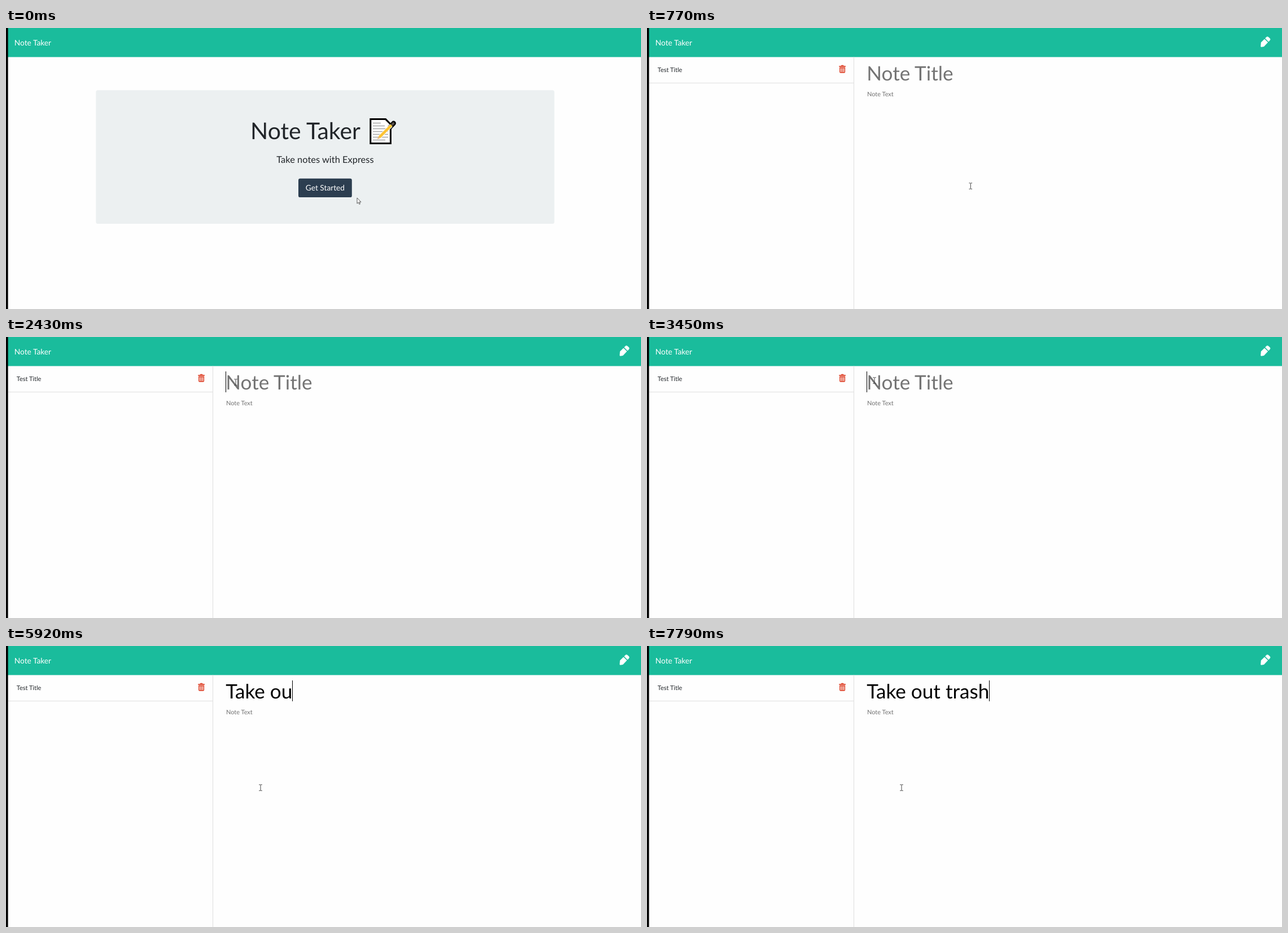
These frames come from a looping animation (1125 by 498 pixels, 8000 ms). An HTML page:

```html
<!DOCTYPE html>
<html lang="en">
<head>
<meta charset="utf-8">
<title>Note Taker</title>
<style>
  html, body { margin: 0; width: 100%; height: 100%; overflow: hidden; background: #fefefe; }
  svg { display: block; width: 100vw; height: 100vh; }
  text {
    font-family: Lato, "Open Sans", sans-serif;
    text-rendering: geometricPrecision;
    white-space: pre;
  }
  .mid { text-anchor: middle; }
  .base { font-size: 10.97px; }
  .large { font-size: 13.71px; }
  .lead { font-size: 16.46px; }
  .title { font-size: 35.11px; }
  .display { font-size: 40.96px; }
  .hint { fill: #737373; }
  .ink { fill: #212529; }
  .light { fill: #fff; }
</style>
</head>
<body>
<svg viewBox="0 0 1125 498" preserveAspectRatio="none">
  <rect width="1125" height="498" fill="#fefefe"/>
  <rect width="1125" height="51.5" fill="#1abc9c"/>
  <text class="large light" x="14.8" y="30.6">Note Taker</text>

  <g id="home">
    <rect x="159.3" y="110.3" width="812.2" height="236.7" rx="3.5" fill="#ecf0f1"/>
    <text class="display ink" x="433" y="197.4">Note Taker</text>
    <g fill="none">
      <path d="M645.8 161.6H672.5L681.4 170.5V204.6H645.8Z" fill="#fff" stroke="#000" stroke-width="3"/>
      <path d="M650 168.5H664M650 173.5H671M650 178.5H677M650 183.5H677M650 188.5H677M650 193.5H677M650 198.5H672"
            stroke="#a6a6a6" stroke-width="1.3"/>
      <path d="M680 176L686.7 168.8" stroke="#000" stroke-width="8.4" stroke-linecap="round"/>
      <path d="M661.5 193.5L682.5 172.7" stroke="#fff" stroke-width="6.4"/>
      <path d="M661.5 193.5L683 172.2" stroke="#fcc334" stroke-width="4.6"/>
      <path d="M684.5 170.8L686.3 169" stroke="#57504a" stroke-width="4" stroke-linecap="round"/>
      <path d="M657.6 197.2L660 191.9L663.1 195Z" fill="#e7b777"/>
    </g>
    <text class="lead ink mid" x="565.4" y="239.4">Take notes with Express</text>
    <rect id="ring" x="516.8" y="265.5" width="97.2" height="36" rx="4.4" fill="none" stroke="#2c3e50" stroke-width="2.4"/>
    <rect id="button" x="518" y="266.7" width="94.8" height="33.4" rx="3.2"/>
    <text class="large light mid" x="565.4" y="288.2">Get Started</text>
  </g>

  <g id="editor">
    <path d="M1101.3 16.3Q1098.9 14.5 1097.2 16.2L1095.1 18.3L1101.2 24.4L1103.5 22.1Q1105.4 20.2 1103.7 18.5Z
             M1094 19.4L1087.8 25.6L1087.2 32.6Q1087.2 33.8 1088.4 33.7L1093 33.1L1100.1 25.5Z" fill="#fff"/>
    <path d="M4 97.5H366.5M366.5 51.5V498" fill="none" stroke="#dfdfdf"/>
    <text class="base ink" x="18.8" y="78.3">Test Title</text>
    <g fill="none" stroke="#df4a32">
      <path d="M340.3 68H351.9" stroke-width="1.8"/>
      <path d="M344 67.3L344.6 66.4H347.6L348.2 67.3" stroke-width="1.1"/>
      <path d="M341.9 70.4V77.8Q341.9 78.8 342.9 78.8H349.3Q350.3 78.8 350.3 77.8V70.4Z" stroke-width="1.7"/>
      <path d="M344.4 71V78M346.1 71V78M347.8 71V78" stroke-width="1"/>
    </g>
    <text id="title" class="title" x="389.3" y="92.7"></text>
    <text class="base hint" x="390" y="120.6">Note Text</text>
    <rect id="caret" y="61" width="1" height="37" fill="#000"/>
  </g>

  <g id="pointer">
    <path id="arrow" d="M.5 .5V10.6L2.9 8.5L4.4 11.9L6 11.2L4.5 7.9H7.4Z" fill="#fff" stroke="#333" stroke-width=".8"/>
    <path id="hand" d="M-1.3 .8Q-1.3 -.3 -.3 -.3T.8 .8V4L5.7 5Q6.7 5.3 6.7 6.5V9Q6.3 11.5 5.2 13.5H-.2L-3.5 8.5Q-3.7 7.2 -2.5 7.2L-1.3 8.3Z"
          fill="#fff" stroke="#111" stroke-width=".7"/>
    <path id="beam" d="M-2.8 -5.2H-.7L0 -4.6L.7 -5.2H2.8M0 -4.6V4.8M-2.8 5.3H-.7L0 4.8L.7 5.3H2.8" fill="none" stroke="#444"/>
  </g>
  <rect width="3.6" height="498" fill="#000"/>
</svg>
<script>
  const LOOP = 8000, PAGE_CHANGE = 770;
  const FOCUS = 2370, BLINK = 540, INPUT_X = 389;
  const PHRASE = "Take out trash";
  const KEYS = [4830, 5060, 5220, 5370, 5450, 5750, 5920, 6150, 6230, 6610, 7080, 7220, 7560, 7790];

  // Pointer moves: first step, last step, number of steps, destination
  const MOVES = [
    [60, 290, 4, 574.5, 282],
    [770, 770, 1, 573.3, 280],
    [840, 1000, 3, 577, 290],
    [1080, 1540, 7, 447, 90],
    [1630, 1780, 3, 378.5, 64],
    [1950, 2430, 7, 407, 80],
    [2590, 2590, 1, 403, 77],
    [3770, 4060, 5, 451, 251]
  ];

  const el = id => document.getElementById(id);
  const show = (id, on) => el(id).setAttribute("visibility", on ? "visible" : "hidden");
  const mix = (a, b, p) => a + (b - a) * p;
  const mixColor = (a, b, p) => `rgb(${a.map((v, i) => Math.round(mix(v, b[i], p)))})`;

  // Progress from 0 to 1 in n equal jumps, the first at start, the last at end
  function steps(t, start, end, n) {
    if (t < start) return 0;
    if (t >= end) return 1;
    return (Math.floor((t - start) / (end - start) * (n - 1)) + 1) / n;
  }

  function pointerAt(t) {
    let x = 621.5, y = 300.5;
    for (const [start, end, n, toX, toY] of MOVES) {
      const p = steps(t, start, end, n);
      x = mix(x, toX, p);
      y = mix(y, toY, p);
    }
    return [x, y];
  }

  function drawPointer(t, onHome) {
    const [x, y] = pointerAt(t);
    const hand = onHome && x < 613 && y < 300;
    const beam = !onHome && x > 389;
    el("pointer").setAttribute("transform", `translate(${x} ${y})`);
    show("hand", hand);
    show("beam", beam);
    show("arrow", !hand && !beam);
  }

  function drawButton(t) {
    const hover = steps(t, 140, 290, 3), press = steps(t, 460, 620, 3);
    const base = [44, 62, 80], over = [30, 43, 55], down = [26, 37, 47];
    el("button").setAttribute("fill", press ? mixColor(over, down, press) : mixColor(base, over, hover));
    el("ring").setAttribute("opacity", press * 0.5);
  }

  function drawTitle(t) {
    const count = KEYS.filter(k => t >= k).length;
    const title = el("title");
    title.textContent = count ? PHRASE.slice(0, count) : "Note Title";
    title.setAttribute("fill", count ? "#000" : "#737373");
    const width = count ? title.getComputedTextLength() : 0;
    el("caret").setAttribute("x", Math.round(INPUT_X + width));
    const blinkOn = Math.floor((t - FOCUS) / BLINK) % 2 === 0;
    el("caret").setAttribute("opacity", t >= FOCUS && (count || blinkOn) ? 1 : 0);
  }

  function draw(t) {
    const onHome = t < PAGE_CHANGE;
    el("home").setAttribute("display", onHome ? "inline" : "none");
    el("editor").setAttribute("display", onHome ? "none" : "inline");
    if (onHome) drawButton(t);
    else drawTitle(t);
    drawPointer(t, onHome);
  }

  const began = performance.now();
  function tick() {
    draw((performance.now() - began) % LOOP);
    requestAnimationFrame(tick);
  }
  tick();
</script>
</body>
</html>
```
